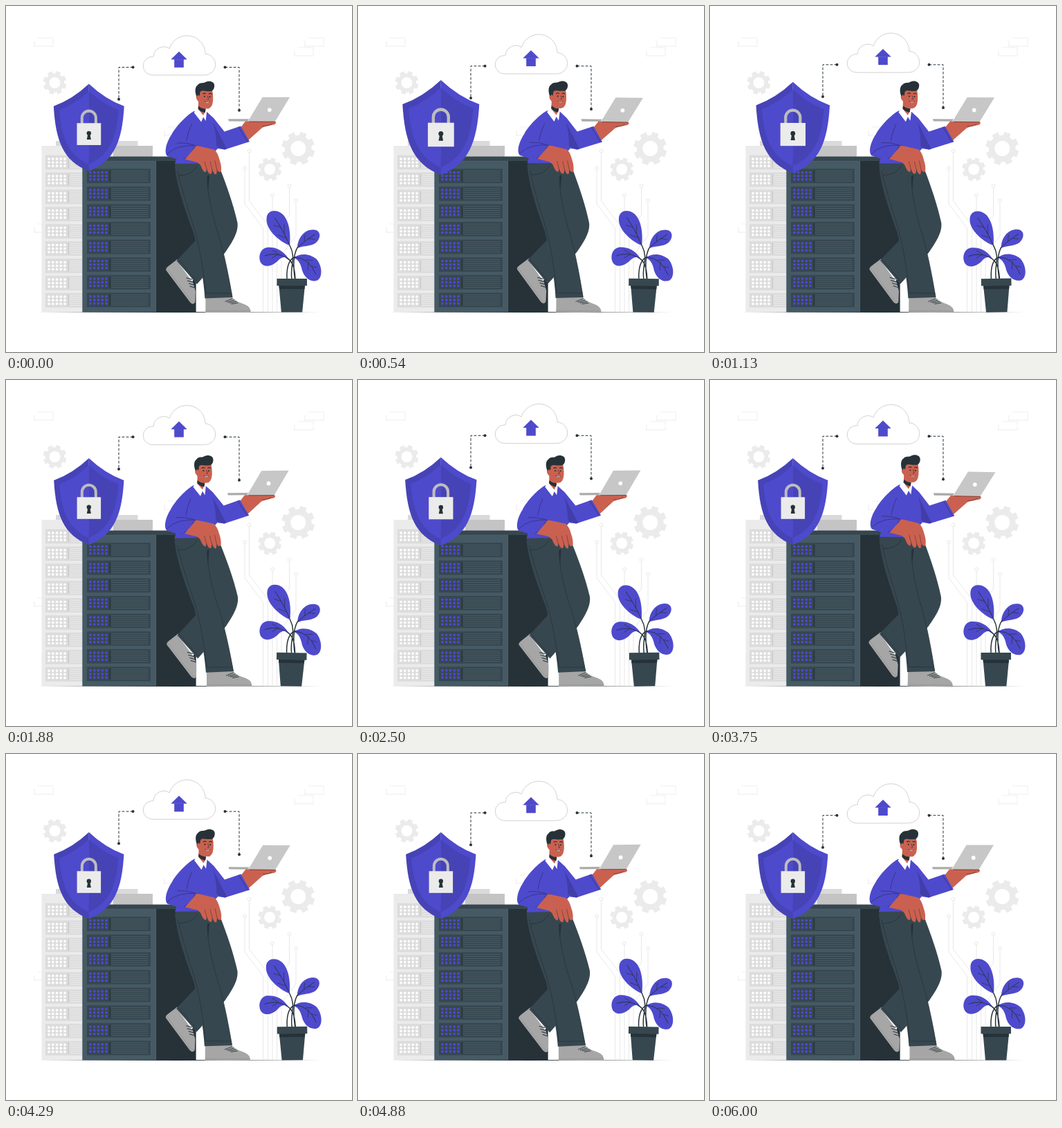
An HTML page with a canvas for the animation above (6040 ms loop, 500 by 500 pixels).

```html
<!DOCTYPE html>
<html lang="en">
<head>
<meta charset="utf-8">
<title>Cloud server security</title>
<style>
html, body { margin: 0; width: 100%; height: 100%; overflow: hidden; background: #fff; }
canvas { display: block; width: 500px; height: 500px; }
</style>
</head>
<body>
<canvas id="stage"></canvas>
<script>
const LOOP = 6040;
const MAIN = '#4e4acc', SHADE = '#4643b7', INK = '#263238', SLATE = '#37474f', STEEL = '#455a64';
const SKIN = '#ca6150', SHOE = '#a6a6a6';

const canvas = document.getElementById('stage');
const ctx = canvas.getContext('2d');
const ratio = window.devicePixelRatio || 1;
canvas.width = canvas.height = Math.round(500 * ratio);

function fill(d, color) {
  ctx.fillStyle = color;
  ctx.fill(new Path2D(d));
}

function line(d, color = INK, width = 0.8) {
  ctx.strokeStyle = color;
  ctx.lineWidth = width;
  ctx.stroke(new Path2D(d));
}

function rect(x1, y1, x2, y2, color) {
  ctx.fillStyle = color;
  ctx.fillRect(x1, y1, x2 - x1, y2 - y1);
}

function dot(x, y, r, color) {
  ctx.fillStyle = color;
  ctx.beginPath();
  ctx.arc(x, y, r, 0, Math.PI * 2);
  ctx.fill();
}

function group(draw, { cx = 0, cy = 0, dy = 0, deg = 0, scale = 1 }) {
  ctx.save();
  ctx.translate(cx, cy + dy);
  ctx.rotate(deg * Math.PI / 180);
  ctx.scale(scale, scale);
  ctx.translate(-cx, -cy);
  draw();
  ctx.restore();
}

// Piecewise linear track of [position, value] pairs.
function track(p, keys) {
  for (let i = 1; i < keys.length; i++) {
    const [a, u] = keys[i - 1], [b, v] = keys[i];
    if (p <= b) return u + (v - u) * (p - a) / (b - a);
  }
  return keys[keys.length - 1][1];
}

const float = p => track(p, [[0, 0], [0.5, -10], [1, 0]]);
const sway = p => track(p, [[0, 0], [0.25, 1], [0.75, -1], [1, 0]]);
const beat = p => track(p, [[0, 1], [0.1, 1.1], [0.3, 1], [0.4, 1], [0.5, 1.1], [0.6, 1], [1, 1]]);

function gear(x, y, r, hole, turn) {
  const body = r * 0.8;
  ctx.fillStyle = '#ebebeb';
  ctx.beginPath();
  for (let i = 0; i < 8; i++) {
    const a = turn + i * Math.PI / 4;
    for (const [da, q] of [[-0.25, body], [-0.2, r], [0.2, r], [0.25, body]])
      ctx.lineTo(x + q * Math.cos(a + da), y + q * Math.sin(a + da));
  }
  ctx.closePath();
  ctx.fill();
  dot(x, y, hole, '#fff');
}

function frameBox(x, y) {
  line(`M${x + 5} ${y}H${x + 27}V${y + 12}`, '#ececec', 0.8);
  line(`M${x} ${y + 12}H${x + 27}M${x} ${y + 5}V${y + 12}`, '#e9e9e9', 0.8);
}

function trace(x, y, d) {
  line(`M${x} ${y + 2.5}${d}`, '#e6e6e6', 0.9);
  ctx.beginPath();
  ctx.arc(x, y, 2.4, 0, Math.PI * 2);
  ctx.stroke();
}

function backdrop() {
  for (const [x, y] of [[41, 46], [432, 46], [417, 60], [229, 175], [41, 315]]) frameBox(x, y);
  gear(70.5, 111, 17.2, 8, 0.33);
  gear(422.3, 206, 24.3, 11, 0.33);
  gear(381.2, 236, 17.2, 8, 0.33);
  trace(345, 234.5, 'V286L371.5 321V442');
  trace(351.5, 209.5, 'V282L378.5 317V442');
  trace(385, 273.5, 'V442');
  trace(409.5, 260, 'V302L391.5 326V442');
  trace(419, 281, 'V332L398 360V442');
}

function cloud() {
  const d = 'M211.5 100A13.3 13.3 0 0 1 211.5 73.4H213' +
    'A15 15 0 0 1 236.2 61.6A26.5 26.5 0 0 1 288 69.4A15.3 15.3 0 0 1 286.8 100Z';
  fill(d, '#fff');
  line(d, '#d2d2d2', 1);
  fill('M250 66L261.7 77.5H238.3Z', MAIN);
  rect(243.2, 77.5, 256.8, 89, MAIN);
  line('M243 77.5H257', SHADE, 0.6);
  ctx.lineCap = 'butt';
  ctx.setLineDash([3.8, 2.3]);
  line('M183.5 88.7H163V135M316.5 88.7H337V151', INK, 1);
  ctx.setLineDash([]);
  ctx.lineCap = 'round';
  for (const [x, y] of [[183.5, 88.7], [163, 135], [316.5, 88.7], [337, 151]]) dot(x, y, 2, INK);
}

function unit(x, y, w, s) {
  rect(x, y - 10.4, x + w, y + 10.4, s.panel);
  rect(x + 32.7, y - 8.5, x + 33.9, y + 8.5, s.split);
  for (let r = -1; r <= 1; r++)
    for (let c = 0; c < 5; c++) dot(x + 5 + c * 5.75, y + r * 5.1, 1.85, s.light);
  for (let i = 0; i < 6; i++)
    line(`M${x + 35.5} ${y - 7.2 + i * 2.9}H${x + w - 4}`, s.slot, 0.9);
}

function servers() {
  rect(72, 195, 190.5, 202, '#dadada');
  rect(51.5, 202, 155, 442, '#ebebeb');
  rect(155, 202, 212, 218, '#c4c4c4');
  const pale = { panel: '#dcdcdc', split: '#c9c9c9', light: '#fff', slot: '#ebebeb' };
  for (let i = 0; i < 9; i++) unit(57, 226 + i * 24.9, 92, pale);

  rect(110.3, 217.5, 275, 224.2, SLATE);
  rect(217, 224, 274.6, 442.5, INK);
  rect(110.3, 224, 217, 442.5, STEEL);
  line('M110.8 224.2H216.6V442', '#546971', 0.6);
  const dark = { panel: SLATE, split: INK, light: MAIN, slot: '#4c616a' };
  for (let i = 0; i < 8; i++) unit(117, 245.6 + i * 25.6, 92, dark);

  // tapered floor line
  fill('M43 442.5Q250 441.6 456 442.5Q250 443.4 43 442.5Z', INK);
}

function shield() {
  const right = 'M119.8 113Q143 135 170.4 145C167.5 195 156.5 224 119.8 238.2Z';
  const left = 'M119.8 113Q96.6 135 69.2 145C72.1 195 83.1 224 119.8 238.2Z';
  const innerRight = 'M119.8 123.5Q140 142 162.5 150.5C159 192 149 215 119.8 228.5Z';
  const innerLeft = 'M119.8 123.5Q99.6 142 77.1 150.5C80.6 192 90.6 215 119.8 228.5Z';
  fill(left, SHADE);
  fill(right, MAIN);
  fill(innerLeft, MAIN);
  fill(innerRight, SHADE);
  line('M109.8 171V161.8A10 10 0 0 1 129.8 161.8V171', '#bdbdbd', 4);
  rect(102.6, 169.3, 137.1, 200.8, '#ebebeb');
  dot(119.8, 183.8, 3.2, INK);
  fill('M118.5 184H121.1L122.8 193H116.8Z', INK);
}

function plant() {
  fill('M410 346C400 343 374 325 376.5 306C378 293 395 293 403 305C411 317 411 335 410 346Z', MAIN);
  fill('M421 350C421 337 430 323 444 323.3C455 323.5 456 335 448 342C440 348 430 346 421 350Z', MAIN);
  fill('M408 365C400 352 388 348 377 349C366 351 364 365 369 372C376 380 388 374 394 367C399 362 404 362 408 365Z', MAIN);
  fill('M416 364C425 356 440 358 449 366C457 376 458 392 450 396.5C440 400 431 392 428 382C426 372 422 366 416 364Z', MAIN);
  line('M413 394C410 375 420 365 410 346M417.5 394C414 370 416 358 421 349M418 394C417 375 413 368 405 363.5M406 394C405 372 412 364 418 363', INK, 1.5);
  line('M410 346Q400 323 388 306M421 349Q433 338 446 330M405 363.5Q390 355 374 361M418 363Q438 364 448 388', INK, 0.9);
  line('M402 329L402 316M397 320L387 317M405 335L393 331M431 340L432 331M437 336L446 337M392 357L385 353M394 358L385 364M433 367L443 367M437 370L436 381M442 376L449 378', INK, 0.7);
  fill('M394.5 404H432L428.3 442.5H398Z', SLATE);
  fill('M394.5 404H432L431.5 409H395Z', INK);
  rect(391.5, 394, 435, 404.3, SLATE);
}

function legs() {
  // bent leg and raised foot
  fill('M236 375L247 366.5L268 391L274 412L273.5 428Q271 433 266 428L231.5 382Q230 379 236 375Z', SHOE);
  fill('M246.5 367L250.5 365L272 394L269 398Z', '#fff');
  line('M232.5 379L267.5 426Q270 429 272.5 427', '#8e8e8e', 0.6);
  line('M261 393L269 395M262.5 397L270 399M264.5 401L271.5 403M266 405L272.5 407', INK, 1);
  fill('M298 230L310 237C319 260 329 288 334.5 313C336 324 331 336 317 356L276 402L246.5 368L273 340L290 300L284 236Z', SLATE);
  line('M249 366L276.5 398', INK, 0.7);
  fill('M283 243L294 245L291.5 272L297 300L288 270Z', INK);

  // standing leg
  fill('M288.5 421H327Q332 427 342 430C351 433 354 437 353.7 443H288.5Z', SHOE);
  line('M288.5 440.5H353', '#8e8e8e', 0.6);
  line('M317 427L327 423M320 428L330 425M323 429L333 427M326 430.5L335 429', INK, 0.9);
  fill('M245 226L304 228L291 246C290 270 300 309 307 330C316 360 322 391 327.5 421L287.5 422.5C286 395 279 359 271 328C260 297 247 264 244 232Z', SLATE);
  line('M291 247C290 270 300 309 307 330C316 360 322 391 327 420', INK, 0.7);
  line('M248 239C257 280 273 318 279 349C285 379 287 398 289 415H326', INK, 0.7);
  line('M250 245Q268 245 276 232', INK, 0.8);
}

function laptop() {
  fill('M321 163.3H351L349 166.6H322Z', '#ababab');
  fill('M370.5 131.6H410L388.8 166.8H349.5Z', '#c7c7c7');
  dot(380.7, 150, 2.9, '#fff');
}

function body() {
  // raised hand
  fill('M337 178L346 166.5L389 166.8Q391.5 169 388 171.2L382 172.5Q374 174 370 176L350 194Z', SKIN);
  line('M352 167.2H388M371 173.5Q381 173.5 384 170', '#5c3936', 0.7);
  // sweater
  fill('M271.5 152C262 157 246 173 239 186C231 198 228 212 233 217L246 221L244 228L286 227.5L306 206L316 207.5L352 196L339 173.5L315.5 181.5L300 162L289 152Z', MAIN);
  fill('M299 168L319 206.5L316 207.5L304 203Q304 184 299 168Z', '#413ea9');
  line('M268 171Q263 182 260.5 195M336 175L349 196M233 214Q247 199 278 202M247 198Q260 197 272 201M257 221Q267 216 272 204', '#2f2f6b', 0.7);
  // collar and neck
  fill('M276.5 147.5L271.5 154L282 167.5L285 160.5L288.5 166L290.3 150.5Z', '#fff');
  fill('M278 137L289 145L288 152L285 158L277.5 149Z', SKIN);
  fill('M278 144.5Q283 149 288.5 148.5L287.5 154Q281 153 277.5 148.5Z', INK);
  // resting hand
  fill('M258.5 221.5L275.5 201.8L301 207.5Q306 212 308.5 222Q312 232 310.8 239Q308 242 305 237L304 243Q301 245 298 236L297 242Q293 245 290 235L289 240Q285 241 281 230L277 226Z', SKIN);
  line('M302 224L305 238M295 225L298 237M287 225L290 236', '#6b3933', 0.7);
}

function head() {
  fill('M276 122L297 119Q299.5 125 299 137Q298 148 291 148.5Q283 148 279 140L277 137Q273.5 134 275 129Z', SKIN);
  fill('M275.5 131C273 126 272 117 277 114C280 110 285 112 287 110.5C293 107 301 109 301 115C301 121 297 124 294 123C287 124 284 121 280.5 124L279.5 130L277.5 128.5Z', INK);
  dot(286.8, 130.8, 1.1, INK);
  dot(294.4, 131.2, 1.1, INK);
  line('M284.5 127Q286.5 125.5 288.5 126.8M293 127Q295 125.8 296.8 127.2', INK, 1.2);
  line('M291 130L292.8 134.8L290.8 135.5', INK, 0.7);
  line('M287 137.8Q290.5 141 294 138.5', INK, 0.8);
  line('M288.8 139.2Q291 140.5 293 139.2', '#fff', 0.7);
}

function person() {
  legs();
  laptop();
  body();
  head();
}

function paint(t) {
  const p = 40 + Math.min(t, 6000) * 5960 / 6000;
  const at = span => (p % span) / span;
  ctx.setTransform(ratio, 0, 0, ratio, 0, 0);
  ctx.lineCap = ctx.lineJoin = 'round';
  rect(0, 0, 500, 500, '#fff');
  backdrop();
  group(cloud, { dy: float(at(6000)) });
  servers();
  group(shield, { cx: 119.8, cy: 175.6, scale: beat(at(6000)) });
  group(plant, { cx: 411, cy: 369, deg: sway(at(1500)) });
  group(person, { cx: 320, cy: 276, deg: sway(at(3000)) });
}

const start = performance.now();
function tick() {
  paint((performance.now() - start) % LOOP);
  requestAnimationFrame(tick);
}
tick();
</script>
</body>
</html>
```
